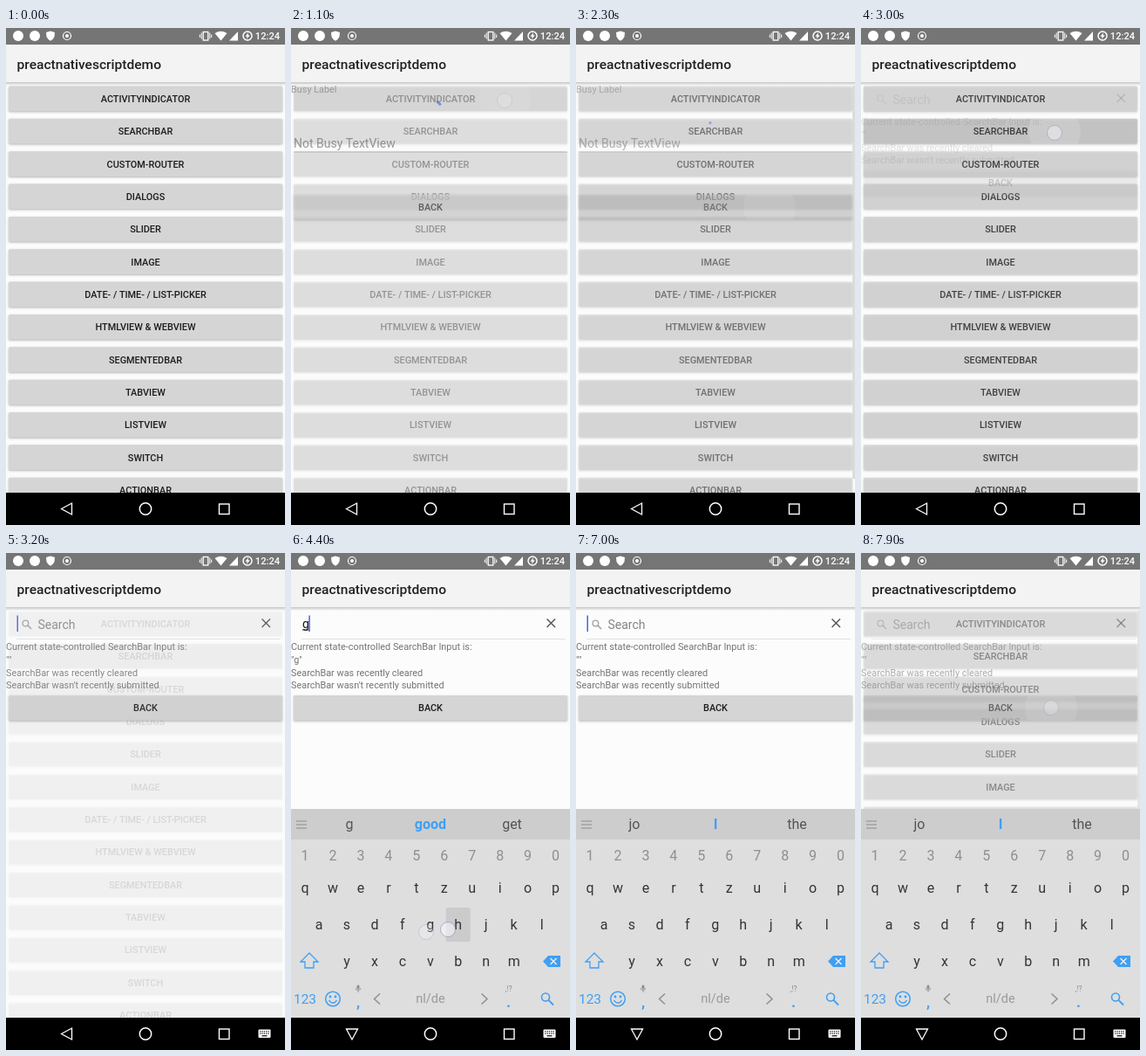
An HTML page with a canvas for the animation above (8 s loop, 320x569 px).

```html
<!DOCTYPE html>
<html lang="en">
<head>
<meta charset="utf-8">
<title>Demo app</title>
<style>
html, body { margin: 0; width: 100%; height: 100%; overflow: hidden; background: #000; }
canvas { display: block; width: 100vw; height: 100vh; }
</style>
</head>
<body>
<canvas id="stage"></canvas>
<script>
const W = 320, H = 569, LOOP = 8000;
const canvas = document.getElementById('stage');
const c = canvas.getContext('2d');
const BLUE = '#3f9ff5', ACCENT = '#4a62e0', GREY = '#747474';

const MENU = ['ACTIVITYINDICATOR', 'SEARCHBAR', 'CUSTOM-ROUTER', 'DIALOGS', 'SLIDER', 'IMAGE',
  'DATE- / TIME- / LIST-PICKER', 'HTMLVIEW & WEBVIEW', 'SEGMENTEDBAR', 'TABVIEW', 'LISTVIEW',
  'SWITCH', 'ACTIONBAR'];

// time, field text, three suggestions
const TYPING = [
  [0, '', 'jo', 'I', 'the'],
  [4300, 'g', 'g', 'good', 'get'],
  [4500, 'gh', 'gh', 'ghost', 'get'],
  [4600, 'ghj', 'ghk', 'ghj', 'ghost'],
  [4800, 'ghjk', 'ghkk', 'ghjk', 'gherkin'],
  [5000, 'ghjkk', 'ghkkk', 'ghjkk', 'gherkin'],
  [6700, '', 'jo', 'I', 'the']
];
const BLINK_STARTS = [3200, 4300, 4500, 4600, 4800, 5000, 5700, 6700];
const SUBMITTED = 5700;

// x, y, down, up
const TOUCHES = [
  [245, 83, 790, 960], [222, 205, 1790, 2040], [222, 120, 2790, 2950],
  [155, 434, 4190, 4300], [180, 431, 4370, 4470], [223, 430, 4560, 4630],
  [255, 430, 4740, 4820], [255, 430, 4930, 5020],
  [294, 510, 5490, 5640], [298, 81, 6590, 6740], [218, 177, 7690, 7790]
];

const clamp = v => Math.max(0, Math.min(1, v));
const ease = v => (1 - Math.cos(Math.PI * clamp(v))) / 2;
const ramp = (t, a, b) => ease((t - a) / (b - a));
const latest = (list, t, key) => list.filter(e => key(e) <= t).pop();

function withAlpha(a, draw) {
  if (a <= 0) return;
  c.save();
  c.globalAlpha *= a;
  draw();
  c.restore();
}

function text(s, x, y, size, color, align = 'left', weight = 400) {
  c.font = `${weight} ${size}px Roboto, sans-serif`;
  c.textAlign = align;
  c.fillStyle = color;
  c.fillText(s, x, y);
}

function rect(x, y, w, h, color) {
  c.fillStyle = color;
  c.fillRect(x, y, w, h);
}

function rounded(x, y, w, h, r, color) {
  c.beginPath();
  c.roundRect(x, y, w, h, r);
  c.fillStyle = color;
  c.fill();
}

function disc(x, y, r, color) {
  c.beginPath();
  c.arc(x, y, r, 0, 7);
  c.fillStyle = color;
  c.fill();
}

function ring(x, y, r, color, width = 1) {
  c.beginPath();
  c.arc(x, y, r, 0, 7);
  c.strokeStyle = color;
  c.lineWidth = width;
  c.stroke();
}

function path(points, closed) {
  c.beginPath();
  points.forEach(([x, y], i) => i ? c.lineTo(x, y) : c.moveTo(x, y));
  if (closed) c.closePath();
}

function line(points, color, width = 1, closed = false) {
  path(points, closed);
  c.strokeStyle = color;
  c.lineWidth = width;
  c.stroke();
}

function shape(points, color) {
  path(points, true);
  c.fillStyle = color;
  c.fill();
}

function magnifier(x, y, s, color, width) {
  ring(x - s * .2, y - s * .2, s * .6, color, width);
  line([[x + s * .25, y + s * .25], [x + s, y + s]], color, width + .3);
}

function button(label, cy, t, down) {
  const held = down ? ramp(t, down, down + 80) * (t < down + 700 ? 1 : 0) : 0;
  c.save();
  c.shadowColor = 'rgba(0,0,0,.28)';
  c.shadowBlur = 2.5;
  c.shadowOffsetY = 1;
  rounded(3, cy - 14.5, 314, 28.7, 1.5, '#d5d5d5');
  c.restore();
  if (held) {
    withAlpha(held, () => rounded(3, cy - 14.5, 314, 28.7, 1.5, 'rgba(0,0,0,.09)'));
    const touch = TOUCHES.find(e => Math.abs(e[2] - down) < 20);
    c.save();
    c.beginPath();
    c.rect(3, cy - 14.5, 314, 28.7);
    c.clip();
    disc(touch[0], cy, 8 + 22 * ramp(t, down, down + 220), 'rgba(255,255,255,.16)');
    c.restore();
  }
  text(label, 160, cy + 3.9, 10.89, '#1c1c1c', 'center', 500);
}

function menuScreen(t) {
  MENU.forEach((name, i) => {
    const down = i === 0 && t < 2000 ? 790 : i === 1 && t > 2600 && t < 5000 ? 2790 : 0;
    button(name, 81 + i * 37.35, t, down);
  });
  const bar = t > 7000 ? 1 : t > 2000 ? 1 - ramp(t, 2400, 2500) : 0;
  withAlpha(bar, () => rect(317, 66, 3, 450, '#c4c4c4'));
}

function spinner(t) {
  const cycle = (t - 997) / 1333, n = Math.floor(cycle), u = cycle - n;
  const base = -82 + 290 * cycle + 270 * n;
  const tail = base + 270 * ease(u * 2 - 1);
  const head = base + 270 * ease(u * 2) + 10;
  c.beginPath();
  c.arc(160, 96, 14, tail * Math.PI / 180, head * Math.PI / 180);
  c.strokeStyle = ACCENT;
  c.lineWidth = 3;
  c.stroke();
}

function busyScreen(t) {
  text('Busy Label', 0, 74, 10.89, GREY);
  spinner(t);
  text('Not Busy TextView', 3, 137, 14, '#5c5c5c');
  rect(3, 141.5, 314, 1, '#8c8c8c');
  button('BACK', 205, t, 1790);
}

function searchScreen(t) {
  const value = latest(TYPING, t, e => e[0])[1];
  let end = 13;
  if (value) {
    text(value, 13, 85.5, 14, '#161616');
    const w = c.measureText(value).width;
    rect(13, 87.5, w, 1, '#222');
    end += w;
  } else {
    magnifier(23.5, 81.5, 5.5, '#a4a4a4', 1.4);
    text('Search', 36.5, 87, 14, '#858585');
  }
  const start = latest(BLINK_STARTS, t, e => e);
  if (start && t < 7700 && Math.floor((t - start) / 500) % 2 === 0)
    rect(end - .5, 71.5, 1.5, 18.5, ACCENT);
  line([[293.5, 75.5], [303, 85]], '#555', 1.4);
  line([[303, 75.5], [293.5, 85]], '#555', 1.4);
  rect(12, 98, 303, 1, '#e2e2e2');
  const sent = t >= SUBMITTED ? 'was' : "wasn't";
  ['Current state-controlled SearchBar Input is:', `"${value}"`, 'SearchBar was recently cleared',
    `SearchBar ${sent} recently submitted`]
    .forEach((s, i) => text(s, 0, 111 + i * 14.75, 10.89, GREY));
  button('BACK', 177.5, t, t > 7000 ? 7690 : 0);
}

function keyRow(keys, x, y, color, size = 16) {
  [...keys].forEach((k, i) => text(k, x + i * 31.95, y, size, color, 'center'));
}

function keyboard(t) {
  rect(0, 293, W, 239, '#dedede');
  rect(0, 293, W, 35, '#cdcdcd');
  [306.5, 310.5, 314.5].forEach(y => rect(6, y, 12, 1, '#8b8b8b'));
  const [, , left, mid, right] = latest(TYPING, t, e => e[0]);
  text(left, 67, 316, 16, '#545454', 'center');
  text(mid, 160, 316, 16, BLUE, 'center', 700);
  text(right, 253.5, 316, 16, '#545454', 'center');

  for (const [x, y, down, up] of TOUCHES) {
    if (y < 420 || y > 440 || t < down || t > up) continue;
    const col = Math.round((x + 6 - 32) / 31.95);
    rounded(18 + col * 31.95, 406, 28, 39, 2, '#cbcbcb');
  }

  keyRow('1234567890', 16, 352, '#8f8f8f');
  keyRow('qwertzuiop', 16, 388.5, '#353535');
  keyRow('asdfghjkl', 32, 430.5, '#353535');
  keyRow('yxcvbnm', 64, 472.5, '#353535');

  line([[21, 458], [31, 468], [26, 468], [26, 475], [16, 475], [16, 468], [11, 468]], BLUE, 1.3, true);
  shape([[289, 467.5], [295, 461], [309, 461], [309, 474], [295, 474]], BLUE);
  line([[297.5, 464], [304.5, 471]], '#eee', 1.4);
  line([[304.5, 464], [297.5, 471]], '#eee', 1.4);

  text('123', 16, 516, 15.5, BLUE, 'center');
  ring(48, 510.5, 8.3, BLUE, 1.5);
  disc(45, 508, 1.4, BLUE);
  disc(51, 508, 1.4, BLUE);
  c.beginPath();
  c.arc(48, 510.5, 4.6, .3, Math.PI - .3);
  c.stroke();

  rounded(75.5, 494.5, 3, 5, 1.5, '#8f8f8f');
  c.beginPath();
  c.arc(77, 498, 2.8, 0, Math.PI);
  c.moveTo(77, 500.8);
  c.lineTo(77, 503);
  c.strokeStyle = '#8f8f8f';
  c.lineWidth = .8;
  c.stroke();
  text(',', 77, 520, 17, BLUE, 'center', 700);
  line([[102, 504.5], [95.5, 510.5], [102, 516.5]], '#8f8f8f', 1.5);
  text('nl/de', 160, 515, 14.5, '#9a9a9a', 'center');
  line([[218.5, 504.5], [225, 510.5], [218.5, 516.5]], '#8f8f8f', 1.5);
  text(',!?', 249.5, 502, 8.5, '#8f8f8f', 'center');
  text('.', 249.5, 520, 17, BLUE, 'center', 700);
  magnifier(293.5, 510, 7.5, BLUE, 1.6);
}

function statusBar() {
  const white = '#fff';
  rect(0, 0, W, 19, '#757575');
  disc(14, 9, 6, white);
  disc(33, 9, 6, white);
  shape([[51, 3.5], [56, 5], [55.5, 10], [53.5, 13], [51, 14.8], [48.5, 13], [46.5, 10], [46, 5]], white);
  ring(70, 9, 4.5, white, 1.2);
  disc(70, 9, 2, white);
  c.strokeStyle = white;
  c.lineWidth = 1.3;
  c.strokeRect(226.2, 4.5, 5.6, 9.5);
  for (const s of [-1, 1]) {
    rect(229 + s * 4.8 - .5, 5.5, 1, 7, white);
    rect(229 + s * 6.7 - .5, 7.5, 1, 3.5, white);
  }
  c.beginPath();
  c.moveTo(246.5, 14.5);
  c.lineTo(239.5, 6);
  c.quadraticCurveTo(246.5, 1.5, 253.5, 6);
  c.fillStyle = white;
  c.fill();
  shape([[256, 14.5], [266, 14.5], [266, 4]], white);
  ring(277, 9, 5, white, 1.5);
  shape([[278, 5], [274.5, 9.7], [276.7, 9.7], [276, 13], [279.7, 8.3], [277.5, 8.3]], white);
  text('12:24', 314, 13.2, 11.1, white, 'right', 500);
}

function actionBar() {
  const shade = c.createLinearGradient(0, 62, 0, 66);
  shade.addColorStop(0, 'rgba(0,0,0,.22)');
  shade.addColorStop(1, 'rgba(0,0,0,0)');
  rect(0, 62, W, 4, shade);
  rect(0, 19, W, 43, '#f3f3f3');
  text('preactnativescriptdemo', 12.6, 46.5, 15.56, '#202020', 'left', 500);
}

function navBar(t) {
  rect(0, 532, W, 37, '#000');
  c.save();
  c.translate(70, 550.5);
  c.rotate(-Math.PI / 2 * ramp(t, 3380, 3640));
  line([[-6.5, 0], [5.5, -6.5], [5.5, 6.5]], '#fff', 1.3, true);
  c.restore();
  ring(160, 550.5, 6.7, '#fff', 1.5);
  c.lineWidth = 1.4;
  c.strokeRect(244.5, 545, 11.5, 11.5);
  if (t < 3100) return;
  rounded(289.5, 545.5, 14, 9.5, 1, '#fff');
  for (let i = 0; i < 10; i++)
    rect(291.2 + i % 5 * 2.3, 547.2 + Math.floor(i / 5) * 2.3, 1.2, 1.2, '#000');
  rect(293.5, 552.2, 6, 1.2, '#000');
}

function touchDots(t) {
  for (const [x, y, down, up] of TOUCHES) {
    if (t < down || t > up + 200) continue;
    withAlpha(1 - clamp((t - up) / 200), () => {
      disc(x, y, 8.5, 'rgba(255,255,255,.5)');
      ring(x, y, 8.5, 'rgba(120,130,200,.55)', 1);
    });
  }
}

function draw(t) {
  rect(0, 0, W, H, '#fcfcfc');
  const toBusy = ramp(t, 870, 1270), fromBusy = ramp(t, 2080, 2500);
  const toSearch = ramp(t, 2880, 3290), fromSearch = ramp(t, 7720, 8120);
  withAlpha(1 - toBusy + fromBusy - toSearch + fromSearch, () => menuScreen(t));
  withAlpha(toBusy - fromBusy, () => busyScreen(t));
  withAlpha(toSearch - fromSearch, () => searchScreen(t));
  const rise = ramp(t, 3350, 3700);
  withAlpha(rise, () => {
    c.translate(0, 24 * (1 - rise));
    keyboard(t);
  });
  actionBar();
  statusBar();
  touchDots(t);
  navBar(t);
}

function frame(now) {
  const dpr = window.devicePixelRatio || 1;
  const w = Math.round(innerWidth * dpr), h = Math.round(innerHeight * dpr);
  if (canvas.width !== w || canvas.height !== h) {
    canvas.width = w;
    canvas.height = h;
  }
  c.setTransform(w / W, 0, 0, h / H, 0, 0);
  draw((now - begin) % LOOP);
  requestAnimationFrame(frame);
}

const begin = performance.now();
frame(begin);
</script>
</body>
</html>
```
